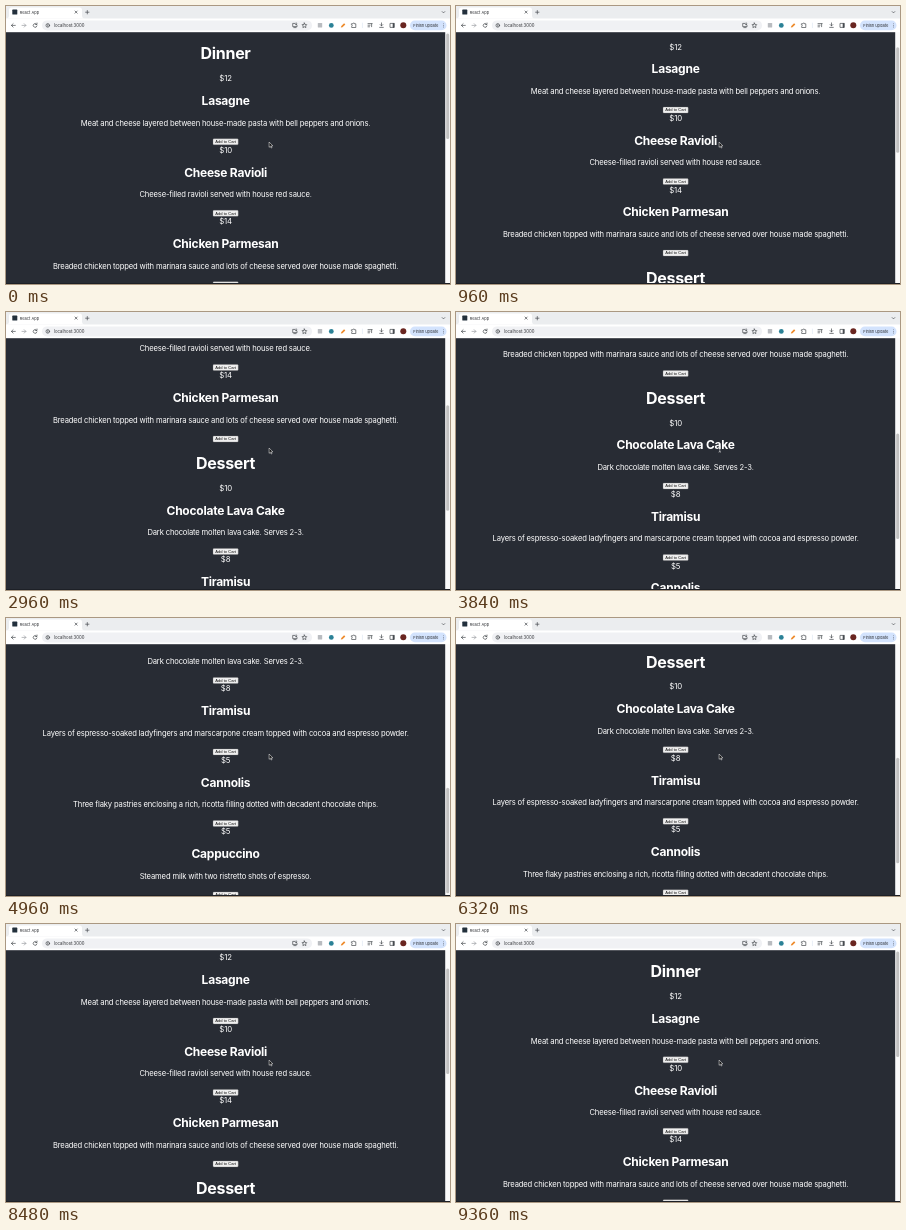
These frames come from a looping animation (444 px wide and 278 px high, 9.44 s). An HTML page:

```html
<!DOCTYPE html>
<html lang="en">
<head>
<meta charset="utf-8">
<title>Menu page</title>
<style>
  html, body { margin: 0; width: 100%; height: 100%; overflow: hidden; background: #282c34; }
  svg { display: block; width: 444px; height: 278px; font-family: Inter, "Open Sans", sans-serif; }
  #page { fill: #fff; text-anchor: middle; }
  #page text { letter-spacing: -.02em; }
  #page .button { font-family: "Liberation Sans", Arial, sans-serif; letter-spacing: 0; fill: #111; }
  .icon { fill: none; stroke: #474b50; stroke-width: .7; stroke-linecap: round; stroke-linejoin: round; }
  .label { font-size: 4.3px; fill: #303236; }
</style>
</head>
<body>
<svg viewBox="0 0 444 278">
  <rect width="444" height="278" fill="#282c34"/>
  <g id="page"></g>

  <!-- scrollbar -->
  <rect x="439.2" y="26" width="4.8" height="252" fill="#fafafa"/>
  <rect id="thumb" x="440.2" width="3" height="105.5" rx="1.5" fill="#c1c1c1"/>
  <rect y="277" width="444" height="1" fill="#1d2026"/>

  <!-- browser bar -->
  <rect width="444" height="13" fill="#ebedef"/>
  <path d="M0 12.6q3 0 3-3V4q0-2.5 2.5-2.5h68q2.5 0 2.5 2.5v5.6q0 3 3 3z" fill="#fff"/>
  <rect y="12.5" width="444" height="13.7" fill="#fff"/>
  <rect x="36" y="14.4" width="270" height="10" rx="5" fill="#f0f1f4"/>
  <rect x="6.3" y="3.6" width="5" height="5" rx=".6" fill="#23303c"/>
  <text class="label" x="13.7" y="7.7" style="font-size:4px">React App</text>
  <text class="label" x="48" y="21">localhost:3000</text>
  <g class="icon">
    <path d="M69 5l2.2 2.2M71.2 5L69 7.2M79.6 6.2H83M81.3 4.5v3.4M436.2 5.6l1.3 1.3 1.3-1.3"/>
    <path d="M9.3 19.4H5.5M7.1 17.7l-1.7 1.7 1.7 1.7"/>
    <path d="M16 19.4h3.8M18.2 17.7l1.7 1.7-1.7 1.7" stroke="#9a9da1"/>
    <path d="M30.7 18.3a1.9 1.9 0 1 0 .3 1.6M31 17v1.5h-1.5"/>
    <circle cx="41.8" cy="19.4" r="1.8"/>
    <path d="M41.8 19.3v1M41.8 18.3v.1"/>
    <path d="M289 17.4h-2.3v3.2h4.4v-1M287.8 21.6h2.3M290.2 16.9v2m-.8-.8l.8.8.8-.8"/>
    <path d="M298.4 17l.7 1.5 1.7.2-1.2 1.2.3 1.7-1.5-.8-1.5.8.3-1.7-1.2-1.2 1.7-.2z"/>
    <path d="M345.7 17.8h1.3a.8.8 0 0 1 1.6 0h1.2v3.7h-4.1v-1.2a.8.8 0 0 0 0-1.5z"/>
    <path d="M362 17.6h4.2M362 19.2h2M362 20.8h1.5M365.6 18v2.7"/>
    <path d="M375.5 16.9v2.9m-1.3-1.2l1.3 1.3 1.3-1.3M373.7 21.4h3.6"/>
    <rect x="384.4" y="17.4" width="4" height="4"/>
    <path d="M387.4 17.6v3.6" stroke-width="1.4"/>
  </g>
  <rect x="311.8" y="17.1" width="4.4" height="4.4" rx=".5" fill="#b9bcc0"/>
  <circle cx="325.3" cy="19.4" r="2.4" fill="#2b8196"/>
  <path d="M334.8 21.6l.5-1.6 2.8-2.8 1.2 1.2-2.8 2.8z" fill="#ee8a2b"/>
  <path d="M356.4 16.7v5.4" stroke="#d3dcec" stroke-width=".5"/>
  <circle cx="397.3" cy="19.3" r="3" fill="#6a2620"/>
  <rect x="404" y="14.5" width="36.5" height="9.8" rx="4.9" fill="#d3e3fd"/>
  <text class="label" x="407.3" y="20.9" style="font-size:4.1px;letter-spacing:-.02em">Finish update</text>
  <g fill="#303236">
    <circle cx="437.4" cy="17.8" r=".4"/><circle cx="437.4" cy="19.4" r=".4"/><circle cx="437.4" cy="21" r=".4"/>
  </g>

  <!-- pointers -->
  <path id="arrow" d="M263.1 136v5.3l1.2-1.1.8 1.8.9-.4-.8-1.7h1.7z" fill="#111" stroke="#fff" stroke-width=".5"/>
  <path id="beam" d="M262.6 134.6q1.2 0 1.2.8 0-.8 1.2-.8M263.8 135.2v4.6M262.6 140.2q1.2 0 1.2-.8 0 .8 1.2.8" fill="none" stroke="#ddd" stroke-width=".6"/>
</svg>
<script>
const LOOP = 9440, STEP = 80, CENTER = 219.6, PITCH = 71.5;
const $ = id => document.getElementById(id);

const menu = [
  ["Dinner", 47.5, 72.5, [
    ["$12", "Lasagne", "Meat and cheese layered between house-made pasta with bell peppers and onions."],
    ["$10", "Cheese Ravioli", "Cheese-filled ravioli served with house red sauce."],
    ["$14", "Chicken Parmesan", "Breaded chicken topped with marinara sauce and lots of cheese served over house made spaghetti."]]],
  ["Dessert", 303.5, 328, [
    ["$10", "Chocolate Lava Cake", "Dark chocolate molten lava cake. Serves 2-3."],
    ["$8", "Tiramisu", "Layers of espresso-soaked ladyfingers and marscarpone cream topped with cocoa and espresso powder."],
    ["$5", "Cannolis", "Three flaky pastries enclosing a rich, ricotta filling dotted with decadent chocolate chips."],
    ["$5", "Cappuccino", "Steamed milk with two ristretto shots of espresso."]]]
];

const line = (text, y, size, weight = 400, cls = "") =>
  `<text class="${cls}" x="${CENTER}" y="${y + size * .36}" font-size="${size}" font-weight="${weight}">${text}</text>`;

const dish = ([price, name, about], y) =>
  line(price, y, 7.8) + line(name, y + 22.3, 12, 700) + line(about, y + 44.3, 7.62) +
  `<rect x="${CENTER - 12.6}" y="${y + 60.3}" width="25.2" height="6" rx=".8" fill="#efefef" stroke="#767676" stroke-width=".3"/>` +
  line("Add to Cart", y + 63.2, 4.1, 400, "button");

$("page").innerHTML = menu.map(([title, y, first, dishes]) =>
  line(title, y, 16, 700) + dishes.map((d, i) => dish(d, first + i * PITCH)).join("")).join("");

// Scroll position over time: [ms, px]
const keys = [
  [0, 0], [480, 0], [1600, 80.5], [1920, 80.5], [2720, 150], [2880, 150], [3680, 215], [3760, 215],
  [4480, 280], [4560, 280], [5000, 330], [5200, 330], [6320, 259.5], [7760, 128], [9040, 0], [LOOP, 0]
];
const slope = i => (keys[i + 1][1] - keys[i][1]) / (keys[i + 1][0] - keys[i][0]);

// Tangent that keeps the curve monotone and flat at pauses
function tangent(i) {
  if (i === 0 || i === keys.length - 1) return 0;
  const a = slope(i - 1), b = slope(i);
  return a * b > 0 ? 2 * a * b / (a + b) : 0;
}

function scrollAt(t) {
  const i = keys.findIndex((k, n) => t < keys[n + 1][0]);
  const [t0, y0] = keys[i], [t1, y1] = keys[i + 1];
  const d = t1 - t0, u = (t - t0) / d, v = 1 - u;
  return y0 * (1 + 2 * u) * v * v + y1 * u * u * (3 - 2 * u) +
    d * u * v * (tangent(i) * v - tangent(i + 1) * u);
}

function draw(now) {
  const t = Math.floor(now % LOOP / STEP) * STEP;
  const scroll = scrollAt(t);
  const overText = t >= 3680 && t < 3920;
  $("page").setAttribute("transform", `translate(0 ${-scroll})`);
  $("thumb").setAttribute("y", 27.6 + scroll * .432);
  $("arrow").style.display = overText ? "none" : "";
  $("beam").style.display = overText ? "" : "none";
  requestAnimationFrame(draw);
}
draw(0);
</script>
</body>
</html>
```
